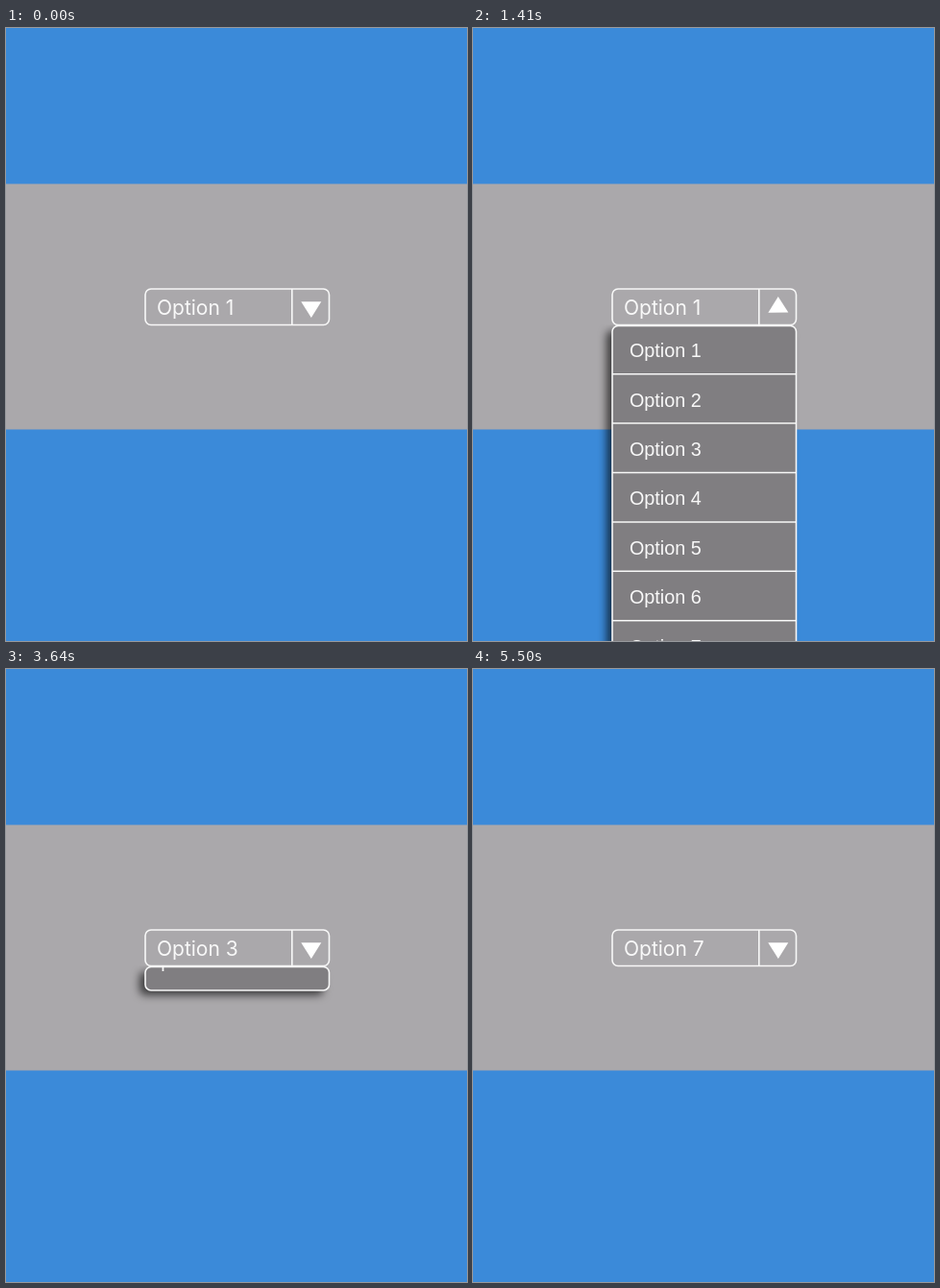
Animation of 480 by 639 pixels, one loop 8900 ms. Source, as an HTML page with a canvas:

```html
<!DOCTYPE html>
<html lang="en">
<head>
<meta charset="utf-8">
<title>Drop-down list</title>
<style>
html, body { margin: 0; width: 100%; height: 100%; overflow: hidden; background: #3b8ad9; }
canvas { display: block; width: 480px; height: 639px; }
</style>
</head>
<body>
<canvas id="stage" width="480" height="639"></canvas>
<script>
const ctx = document.getElementById('stage').getContext('2d');
const LOOP = 8900, STEP = 45;
const ROW = 51.4, TOP = 309.3, ROWS = 10, FULL = ROW * ROWS;
const WHITE = '#f8f8f8';

// Each visit: when the list opens and closes, and the spring's head start (ms)
const visits = [
  { open: 950, close: 2590, lead: 20.5 },
  { open: 3640, close: 5270, lead: 17 }
];

const stepped = ms => Math.floor(ms / STEP) * STEP;

function spring(ms) {
  if (ms >= 900) return 1;
  const s = ms / 1000, w = 19, z = 0.4, d = Math.sqrt(1 - z * z);
  return 1 - Math.exp(-z * w * s) * (Math.cos(w * d * s) + z / d * Math.sin(w * d * s));
}

// size: share of the full height; slide: progress of the row texts
function listState(t) {
  const v = visits.findLast(v => t >= v.open);
  if (!v) return { size: 0, slide: 0 };
  if (t < v.close) {
    const k = spring(stepped(t - v.open) + v.lead);
    return { size: k, slide: k };
  }
  const size = Math.exp(-((stepped(t - v.close) / 90) ** 2));
  return { size: size < 0.001 ? 0 : size, slide: 1 };
}

function box(x, y, w, h) {
  ctx.beginPath();
  ctx.roundRect(x, y, w, h, Math.min(6, h / 2));
}

function line(x1, y1, x2, y2) {
  ctx.beginPath();
  ctx.moveTo(x1, y1);
  ctx.lineTo(x2, y2);
  ctx.stroke();
}

function drawList({ size, slide }) {
  const h = size * FULL;
  if (h < 1) return;
  ctx.save();
  ctx.beginPath();
  ctx.rect(0, 309.5, 480, 330);
  ctx.clip();

  ctx.save();
  ctx.shadowColor = 'rgba(0,0,0,' + 0.65 * Math.min(1, h / 25) + ')';
  ctx.shadowBlur = 9;
  ctx.shadowOffsetX = -6;
  ctx.shadowOffsetY = 5;
  ctx.fillStyle = '#807e81';
  box(145, 310.5, 191.5, h);
  ctx.fill();
  ctx.restore();

  ctx.save();
  box(145, 310.5, 191.5, h);
  ctx.clip();
  ctx.font = '19.8px "Liberation Sans", Arial, sans-serif';
  ctx.fillStyle = WHITE;
  ctx.lineWidth = 1.5;
  for (let i = 0; i < 7; i++) {
    const y = TOP + i * ROW;
    ctx.fillText('Option ' + (i + 1), 145 + 18 * slide, y + 34 * slide);
    line(145, y + ROW, 336.5, y + ROW);
  }
  ctx.restore();

  ctx.lineWidth = 1.6;
  box(145, 310.5, 191.5, h);
  ctx.stroke();
  ctx.restore();
}

function drawField(choice, turn) {
  ctx.lineWidth = 1.6;
  box(145, 272, 191.5, 37.5);
  ctx.stroke();
  line(297.8, 272, 297.8, 309.5);
  ctx.fillStyle = WHITE;
  ctx.font = '21px Inter, Roboto, sans-serif';
  ctx.fillText('Option ' + choice, 157, 298.5);

  ctx.save();
  ctx.translate(317.8, 291);
  ctx.rotate(turn * Math.PI);
  ctx.fillStyle = '#fff';
  ctx.beginPath();
  ctx.moveTo(-10.5, -5.7);
  ctx.lineTo(10.5, -5.7);
  ctx.lineTo(0, 11);
  ctx.fill();
  ctx.restore();
}

function draw(t) {
  ctx.fillStyle = '#3b8ad9';
  ctx.fillRect(0, 0, 480, 639);
  ctx.fillStyle = '#aaa8ab';
  ctx.fillRect(0, 162.5, 480, 256);
  ctx.strokeStyle = WHITE;
  const list = listState(t);
  drawList(list);
  drawField(t < 2360 ? 1 : t < 5050 ? 3 : 7, Math.max(0, (list.size - 0.07) / 0.93));
}

function tick() {
  draw(performance.now() % LOOP);
  requestAnimationFrame(tick);
}
tick();
</script>
</body>
</html>
```
